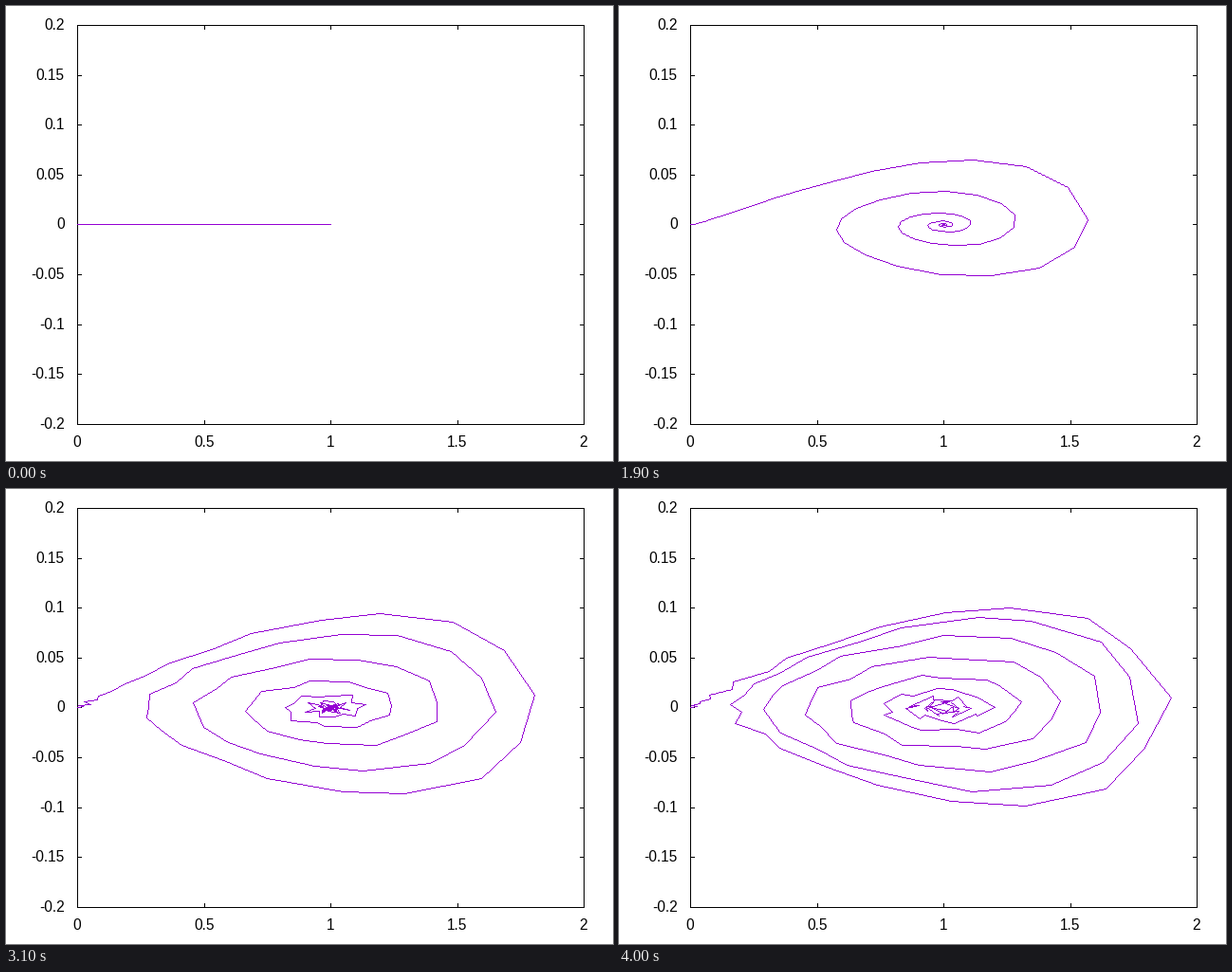
Write a matplotlib script that moves like this. It is 640 by 480 pixels and loops after 4.1 s.

```python
import math

import matplotlib.pyplot as plt
import numpy as np
from matplotlib.animation import FuncAnimation

W, H, DPI = 640, 480, 100
FRAMES, INTERVAL = 41, 100
LEFT, RIGHT, TOP, BOTTOM = 75, 609, 20, 441
PIXEL = 72 / DPI
PURPLE = (148, 0, 211, 255)
TURNS = 16


def logistic(x):
    return 1 / (1 + math.exp(-x))


def swing(k, n):
    """Distance from u = 1 after k half oscillations behind the front."""
    onset = np.clip((n - 5) / 5, 0, 1)
    reach = .24 * n - 4.1
    spread = .56 + .058 * n
    return onset * logistic((reach - k) / spread)


def front_shape(n):
    """Scale and exponent of the leading rise, s**p * sqrt(1 - s)."""
    height = .103 * logistic((n - 15.5) / 6.5)
    power = 1 + .65 * logistic((14.5 - n) / 4)
    s = power / (power + .5)
    return height / (s ** power * math.sqrt(1 - s)), power


def phase_curve(n):
    """Grid points (u, change of u per step) from the front to the rear."""
    if n == 0:
        return np.array([0, 1]), np.zeros(2)
    scale, power = front_shape(n)
    peak = 1 + swing(0, n)
    points = [(0, 0, 0)]
    turn = .04
    while turn < TURNS:
        if turn < 1:
            s = math.sin(math.pi * turn / 2) ** 2
            u = peak * s
            v = scale * s ** power * math.sqrt(1 - s)
            step = scale * s ** (power - .5) / (.18 * peak ** 2 * math.pi)
        else:
            # cnoidal wave with slowly varying modulus
            m = swing(turn - 1, n)
            u = 1 - m * math.cos(math.pi * turn)
            root = math.sqrt(max(u + 1 - m, 0))
            v = .0551 * m * (1 + m) * math.sin(math.pi * turn) * root
            step = .0974 * root
        points.append((u, v, turn))
        turn += max(step, .02)
    return add_ripple(n, *np.array(points).T)


def add_ripple(n, u, v, turns):
    """Grid-scale zigzag that builds up late in the run."""
    i = np.arange(len(u))
    grow = np.clip((n - 19) / 15, 0, 1) ** 1.3
    sign = np.where(i % 2, 1, -1)
    u = u + sign * .03 * grow * (.6 + .4 * np.sin(.7 * i + n)) * (i > 0)
    v = v + .004 * grow * np.sin(2.3 * i + n) * np.clip(turns / 12, 0, 1)
    return np.abs(u), v


def stroke(u, v):
    """Hard-edged pixels (column, row) along the polyline."""
    x = np.rint(LEFT + u * (RIGHT - LEFT) / 2)
    y = np.rint(230.4 - v * (BOTTOM - TOP) / .4)
    lengths = np.maximum(abs(np.diff(x)), abs(np.diff(y)))
    ends = np.concatenate([[0], np.cumsum(lengths)])
    t = np.arange(ends[-1] + 1)
    return [np.rint(np.interp(t, ends, c)).astype(int) for c in (x, y)]


fig = plt.figure(figsize=(W / DPI, H / DPI), dpi=DPI, facecolor="white")
canvas = np.zeros((H, W, 4), dtype=np.uint8)
picture = fig.figimage(canvas, origin="upper")
ax = fig.add_axes([0, 0, 1, 1])
ax.set_xlim(0, W)
ax.set_ylim(H, 0)
ax.axis("off")


def rule(xs, ys):
    ax.plot(xs, ys, color="black", lw=PIXEL, snap=True,
            solid_capstyle="projecting", solid_joinstyle="miter")


def label(x, y, text, align):
    ax.text(x, y, text, ha=align, va="baseline", color="black",
            family="Liberation Sans", fontsize=11.2)


rule([LEFT, RIGHT, RIGHT, LEFT, LEFT], [TOP, TOP, BOTTOM, BOTTOM, TOP])
for k in range(5):
    x = int(LEFT + k * (RIGHT - LEFT) / 4 + .5)
    rule([x, x], [TOP, TOP + 4])
    rule([x, x], [BOTTOM, BOTTOM - 4])
    label(x, 464.6, f"{k / 2:g}", "center")
for k in range(9):
    y = round(TOP + k * (BOTTOM - TOP) / 8)
    rule([LEFT, LEFT + 4], [y, y])
    rule([RIGHT, RIGHT - 4], [y, y])
    label(61.5, y + 4.6, f"{(4 - k) / 20:g}", "right")


def draw(n):
    columns, rows = stroke(*phase_curve(n))
    canvas[:] = 0
    canvas[rows, columns] = PURPLE
    picture.set_data(canvas)
    return picture,


anim = FuncAnimation(fig, draw, frames=FRAMES, interval=INTERVAL,
                     repeat=True, repeat_delay=0, blit=False)
plt.show()
```
